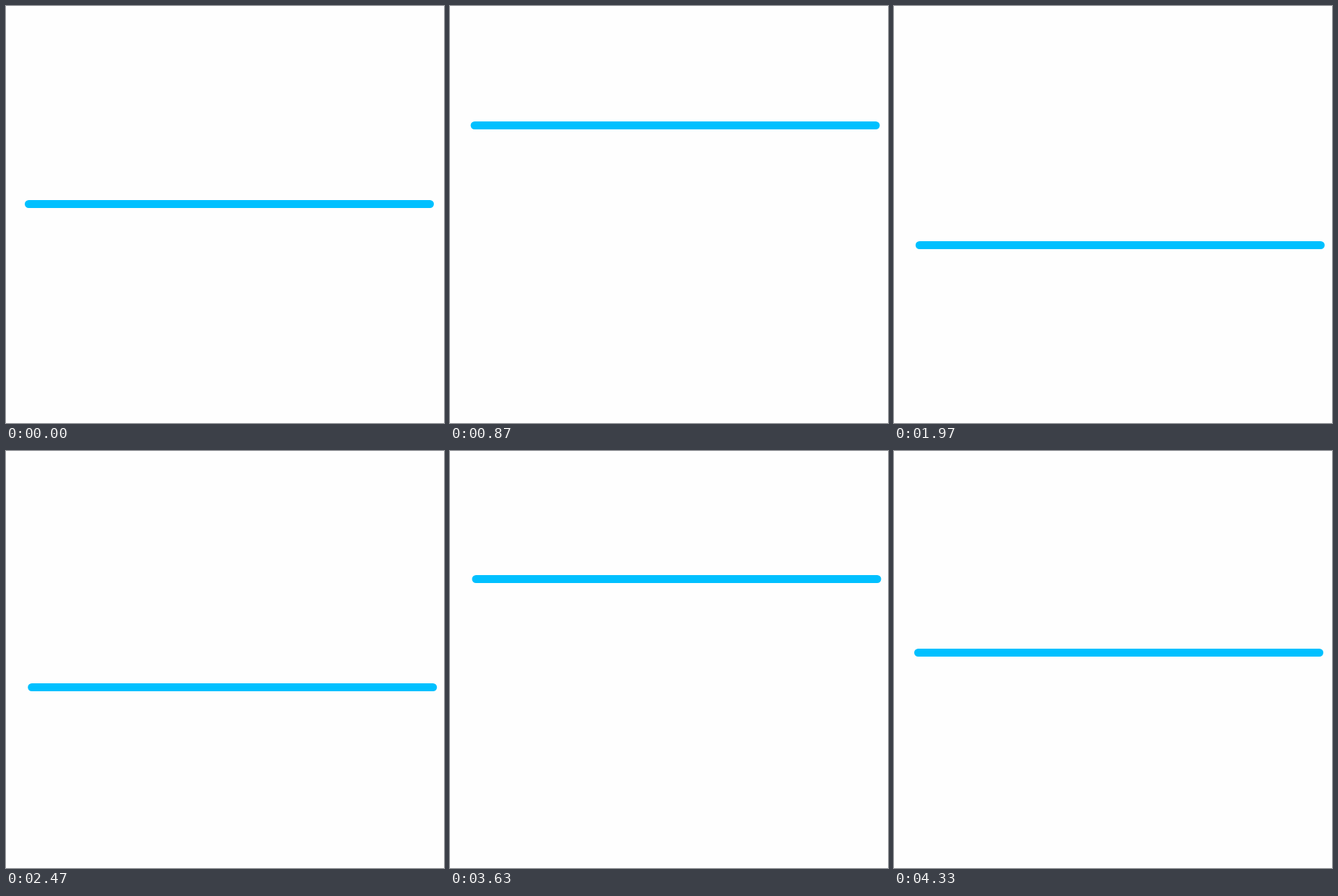
Animation of 606 by 578 pixels, one loop 5010 ms. Source, as an HTML page:

```html
<!DOCTYPE html>
<html lang="en">
<head>
<meta charset="utf-8">
<title>Scan line</title>
<style>
  html, body { margin: 0; width: 100%; height: 100%; overflow: hidden; background: #fefefe; }
  #line {
    position: absolute; left: 0; top: 0;
    width: 566px; height: 11px; border-radius: 5.5px;
    background: #00c0ff;
  }
</style>
</head>
<body>
<div id="line"></div>
<script>
  const LOOP = 5010, FPS = 30;
  const line = document.getElementById('line');

  // The line sweeps at an even speed between turning points, resting briefly at the top.
  const turns = [
    { t: 0, x: 26, y: 269 },
    { t: 785, x: 28.5, y: 150 },
    { t: 800, x: 28.5, y: 150 },
    { t: 2205, x: 30.1, y: 362 },
    { t: 3525, x: 30.8, y: 160 },
    { t: 3553, x: 30.8, y: 160 },
    { t: 4310, x: 28, y: 274 }
  ];

  const mix = (a, b, u) => a + (b - a) * u;

  function pose(t) {
    const next = turns.findIndex(p => p.t > t);
    if (next < 0) return turns[turns.length - 1];
    const a = turns[next - 1], b = turns[next];
    const u = (t - a.t) / (b.t - a.t);
    return { x: mix(a.x, b.x, u), y: mix(a.y, b.y, u) };
  }

  // Start of the current step; steps begin on 10 ms ticks
  function stepTime(t) {
    const tick = Math.floor(t / 10) * 10;
    return Math.floor((tick + 5) * FPS / 1000) * 1000 / FPS;
  }

  const start = performance.now();
  function draw(now) {
    const t = Math.max(0, now - start) % LOOP;
    const { x, y } = pose(stepTime(t));
    line.style.transform = `translate(${x}px, ${Math.round(y)}px)`;
    requestAnimationFrame(draw);
  }
  draw(start);
</script>
</body>
</html>
```
